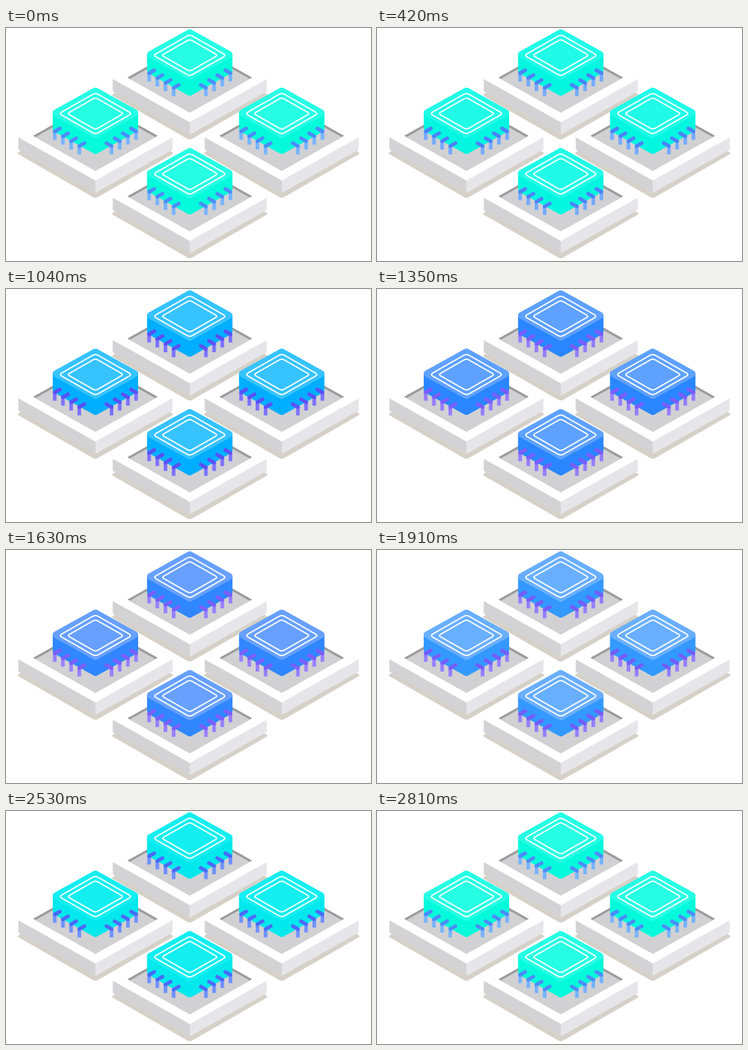
An HTML page for the animation above (2.88 s loop, 500 by 320 pixels).

```html
<!DOCTYPE html>
<html lang="en">
<head>
<meta charset="utf-8">
<title>Chips</title>
<style>
  html, body { margin: 0; width: 100%; height: 100%; overflow: hidden; background: #fff; }
  svg { display: block; }
  .top { fill: var(--top); stroke: var(--top); }
  .side { fill: var(--side); stroke: var(--side); }
  .top, .side { stroke-width: 9; stroke-linejoin: round; }
  .ring { fill: none; stroke: #fff; stroke-width: 1.9; }
  .leg, .arm { fill: none; stroke-width: 5; }
  .leg { stroke: var(--leg); }
  .arm { stroke: var(--arm); stroke-linecap: round; }
</style>
</head>
<body>
<svg id="stage" width="500" height="320" viewBox="0 0 500 320">
  <defs>
    <clipPath id="recess"><path d="M-85.500 68L0 20L85.500 68L0 116Z"/></clipPath>
    <g id="chip"></g>
  </defs>
</svg>
<script>
const LOOP = 2880;
const PARTS = ['top', 'side', 'leg', 'arm'];
// time, then the colour of each part
const KEYS = [
  [0, '26ffe4', '05fadb', '78b4ff', '4b8cf8'],
  [360, '26ffe4', '05fadb', '78b4ff', '4b8cf8'],
  [760, '00e8ff', '00e2ff', '6478ff', '484cf8'],
  [1040, '36c3ff', '00aeff', '7d73ff', '5a50f5'],
  [1350, '5ea1ff', '2a86ff', '967dff', '7a5cfa'],
  [1490, '6699ff', '2f7eff', '9b80ff', '805ffa'],
  [1910, '69afff', '3399ff', '957fff', '755cfa'],
  [2250, '00dcff', '00d6ff', '6670ff', '4a48f8'],
  [2810, '26ffe4', '05fadb', '78b4ff', '4b8cf8'],
  [LOOP, '26ffe4', '05fadb', '78b4ff', '4b8cf8']
].map(([time, ...colors]) => ({
  time,
  colors: colors.map(c => c.match(/../g).map(h => parseInt(h, 16)))
}));

const path = (d, attrs) => `<path d="${d}" ${attrs}/>`;

// Diamond around (0, cy) whose corners are cut by the share `round`
function diamond(w, h, cy, round = 0) {
  const pts = [[-w, cy], [0, cy - h], [w, cy], [0, cy + h]];
  const toward = (a, b) => a.map((v, i) => v + (b[i] - v) * round);
  return pts.map((p, i) => {
    const before = toward(p, pts[(i + 3) % 4]);
    const after = toward(p, pts[(i + 1) % 4]);
    return `${i ? 'L' : 'M'}${before}Q${p} ${after}`;
  }).join('') + 'Z';
}

function pins() {
  let out = '';
  for (const side of [-1, 1]) {
    for (let i = 0; i < 4; i++) {
      const x = 55.7 - 11.2 * i, y = 62 + 6.7 * i;
      out += path(`M${side * x} ${y - 1}V${y + 11.5}`, 'class="leg"');
      out += path(`M${side * x} ${y}L${side * (x - 7)} ${y - 4}`, 'class="arm"');
    }
  }
  return out;
}

document.getElementById('chip').innerHTML =
  path(diamond(108, 62, 92, .03), 'fill="#d6d1c8"') +
  path('M-105.500 70L0 129V146.500L-105.500 87Z', 'fill="#d3d3d6"') +
  path('M105.500 70L0 129V146.500L105.500 87Z', 'fill="#e6e6ea"') +
  path(diamond(105.5, 59.5, 70), 'fill="#fff"') +
  '<g clip-path="url(#recess)">' +
  path(diamond(86, 48.5, 68), 'fill="#9b9b9d"') +
  path(diamond(86, 48.5, 72), 'fill="#d1d1d4"') + '</g>' +
  path('M-54 36.500L0 6.500L54 36.500V58.500L0 88.500L-54 58.500Z', 'class="side"') +
  path(diamond(54, 30, 36.5), 'class="top"') +
  path(diamond(50, 28.5, 37.5, .08), 'class="ring"') +
  path(diamond(38.5, 22, 37.5, .08), 'class="ring"') +
  pins();

const stage = document.getElementById('stage');
for (const [x, y] of [[251.75, 0], [122.5, 80], [377.75, 80], [251.75, 163]]) {
  stage.insertAdjacentHTML('beforeend', `<use href="#chip" x="${x}" y="${y}"/>`);
}

function draw(now) {
  const t = now % LOOP;
  const next = KEYS.findIndex(k => k.time > t);
  const a = KEYS[next - 1], b = KEYS[next];
  const p = (t - a.time) / (b.time - a.time);
  PARTS.forEach((part, i) => {
    const rgb = a.colors[i].map((v, c) => Math.round(v + (b.colors[i][c] - v) * p));
    stage.style.setProperty('--' + part, `rgb(${rgb})`);
  });
}

function tick() {
  draw(performance.now());
  requestAnimationFrame(tick);
}
tick();
</script>
</body>
</html>
```
